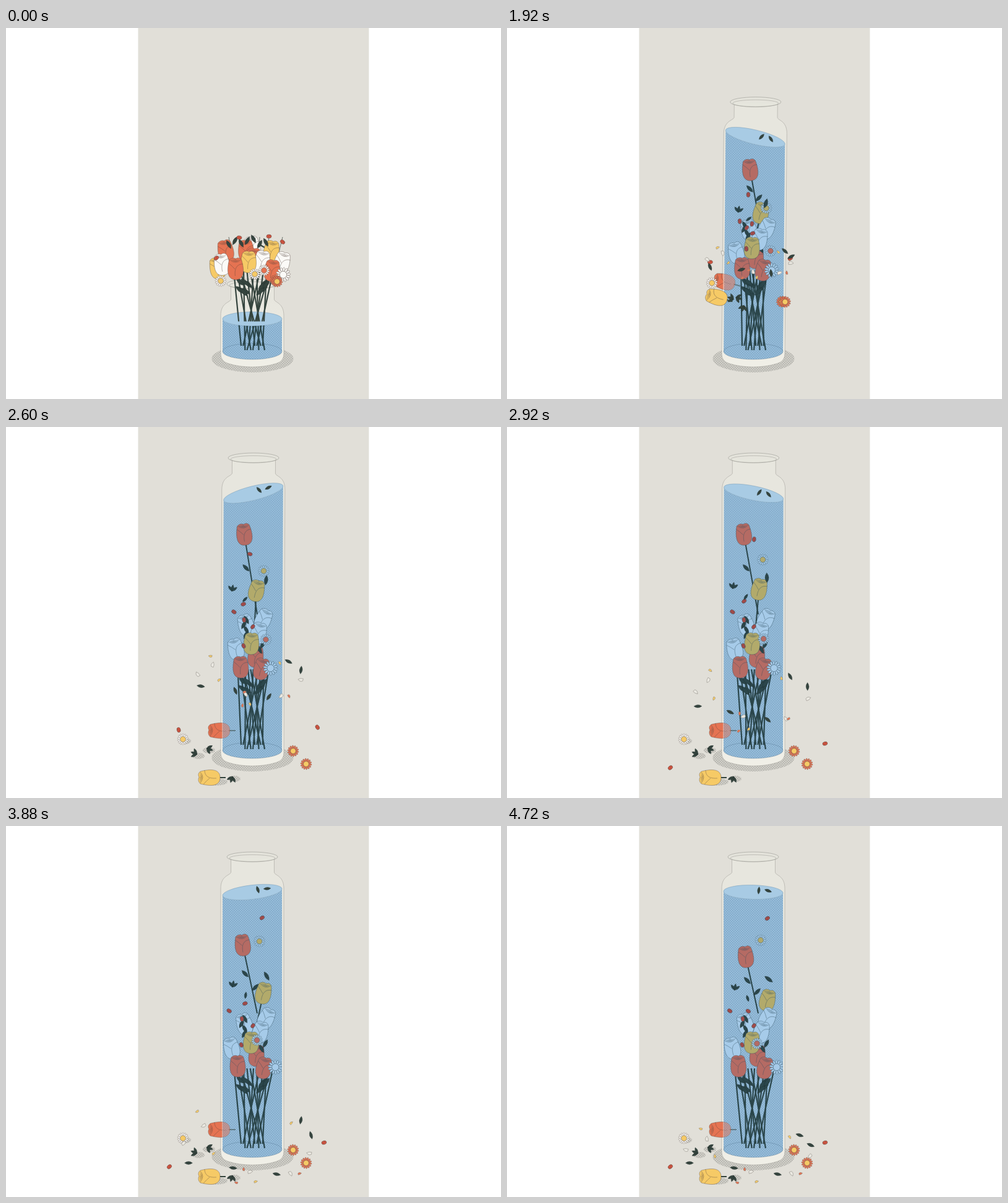
An HTML page with a canvas for the animation above (4760 ms loop, 800 by 600 pixels).

```html
<!DOCTYPE html>
<html>
<head>
<meta charset="utf-8">
<style>
html, body { margin: 0; height: 100%; overflow: hidden; background: #fff; }
canvas { display: block; }
</style>
</head>
<body>
<canvas id="stage" width="800" height="600"></canvas>
<script>
const c = document.getElementById('stage').getContext('2d');
const LOOP = 4760, BURST = 1760, SETTLE = 2280, MID = 398;
const DRY = { red: '#e57352', yellow: '#f6ca66', white: '#fbfaf7', green: '#35443e', berry: '#d65440', line: 'rgba(80,65,58,.75)' };
const WET = { red: '#b56b64', yellow: '#b2aa6b', white: '#a6cbe9', green: '#2b464b', berry: '#ad4b47', line: 'rgba(45,75,92,.75)' };
let pal = DRY, t = 0, since = 0, grow = 0;

// Blooms go from the bouquet to their place under water; those with "via" float on their own.
const BACK_ROSES = [
  { color: 'white', from: [398, 354], to: [385, 320], angle: -.3 },
  { color: 'red', from: [388, 360], via: [394, 198], to: [386, 212], lift: 31, angle: -.12 },
  { color: 'yellow', from: [429, 361], via: [406, 284], to: [421, 282], lift: 21, angle: .22 },
  { color: 'white', from: [446, 379], to: [421, 311], angle: .45 },
  { color: 'red', from: [400, 373], to: [405, 371], angle: .1 }
];
const FRONT_ROSES = [
  { color: 'white', from: [414, 377], to: [411, 333], angle: .25 },
  { color: 'white', from: [349, 382], to: [364, 359], angle: -.25 },
  { color: 'yellow', from: [392, 378], to: [396, 350], angle: .05 },
  { color: 'red', from: [371, 389], to: [374, 388], angle: -.05 },
  { color: 'red', from: [430, 392], to: [417, 391], angle: .2 }
];
const DAISIES = [
  { color: 'white', middle: 'white', from: [448, 399], to: [436, 390], scale: 1.3 },
  { color: 'white', middle: 'yellow', from: [402, 398], via: [423, 266], to: [410, 185], lift: 15 },
  { color: 'white', middle: 'red', from: [417, 392], via: [428, 353], to: [404, 352], lift: 10 }
];
const BERRIES = [
  { from: [377, 339], via: [393, 253], to: [421, 150], lift: 25 },
  { from: [425, 337], via: [389, 312], to: [390, 300], lift: 25 },
  ...[[360, 299], [399, 323], [381, 312], [380, 354]].map(to => ({ from: [390, 370], to, hidden: true }))
];
const FLOATING_LEAVES = [[368, 265], [389, 279], [423, 248]].map(to => ({ from: [398, 375], via: [to[0], to[1] + 14], to, lift: 12 }));

// Things thrown out of the vase, landing on the table.
const LOST_ORANGE = { color: 'red', from: [355, 360], land: [344, 491], time: 420 };
const LOST_YELLOW = { color: 'yellow', from: [342, 388], land: [328, 567], time: 610 };
const LOST_DAISIES = [
  { color: 'white', middle: 'yellow', from: [347, 409], land: [286, 505], time: 620, arc: 28 },
  { color: 'red', middle: 'yellow', from: [436, 408], land: [464, 524], time: 540 },
  { color: 'red', middle: 'yellow', from: [438, 410], land: [485, 545], time: 660 }
];
const LOST_BERRIES = [
  { from: [340, 372], land: [264, 551], time: 1050, arc: 40 },
  { from: [447, 346], land: [514, 512], time: 1000 }
];
const LOST_SPRIGS = [[325, 520], [366, 566], [308, 529]].map(land => ({ from: [390, 400], land, time: 540 }));
// Where the slow petals and leaves come to rest.
const DEBRIS = {
  white: [[289, 524], [317, 506], [388, 559], [459, 562], [495, 534]],
  yellow: [[313, 490], [330, 534], [397, 575], [456, 503]],
  red: [[372, 577], [378, 555], [468, 562]],
  leaf: [[295, 545], [361, 553], [431, 563], [472, 500], [496, 516]]
};

const mix = (a, b, k) => a + (b - a) * k;
const mixPoint = (a, b, k) => [mix(a[0], b[0], k), mix(a[1], b[1], k)];
const unit = v => Math.min(1, Math.max(0, v));
function seeded(seed) {
  return () => (seed = seed * 16807 % 2147483647) / 2147483647;
}

// The bunch is pinched at first, then opens out again.
const spread = x => MID + (x - MID) * (1 - .42 * grow * Math.exp(-since / 500));

function place({ from, via, to, land, time, lift = 0, arc = 0 }) {
  if (t <= BURST) return from;
  if (land) {
    const k = unit((t - BURST) / time), [x, y] = mixPoint(from, land, k);
    return [x, y - 4 * arc * k * (1 - k)];
  }
  if (!via) return mixPoint(from, [spread(to[0]), to[1]], grow);
  if (t < SETTLE) return mixPoint(from, via, grow);
  const k = since / (LOOP - SETTLE), [x, y] = mixPoint(via, to, 1 - (1 - k) ** 2);
  return [x - lift * .25 * Math.sin(Math.PI * Math.sqrt(k)), y - lift * Math.sin(Math.PI * Math.sqrt(k))];
}

function halftone(color) {
  const tile = document.createElement('canvas');
  tile.width = tile.height = 4;
  const p = tile.getContext('2d');
  p.fillStyle = color;
  for (const o of [0, 2]) p.fillRect(o, o, 1.5, 1.5);
  return c.createPattern(tile, 'repeat');
}
const WATER_DOTS = halftone('rgba(80,125,160,.4)');
const SHADE_DOTS = halftone('rgba(85,85,82,.3)');
const GLASS = c.createLinearGradient(0, 440, 0, 535);
GLASS.addColorStop(0, '#e7e6de');
GLASS.addColorStop(1, '#f0efe7');

function at([x, y], angle, draw) {
  c.save();
  c.translate(x, y);
  c.rotate(angle);
  c.beginPath();
  draw();
  c.restore();
}
function paint(fill, line = pal.line, width = .5) {
  c.fillStyle = fill;
  c.fill();
  c.strokeStyle = line;
  c.lineWidth = width;
  c.stroke();
}
function oval(x, y, rx, ry, angle = 0) {
  c.beginPath();
  c.ellipse(x, y, rx, ry, angle, 0, 7);
}
function stem(x1, y1, x2, y2, width = 2) {
  c.beginPath();
  c.moveTo(x1, y1);
  c.lineTo(x2, y2);
  c.strokeStyle = pal.green;
  c.lineWidth = width;
  c.stroke();
}
function clipped(path, draw) {
  c.save();
  c.clip(path);
  draw();
  c.restore();
}
function shadow(x, y, rx, ry) {
  oval(x, y, rx, ry);
  for (const fill of ['rgba(140,138,133,.2)', SHADE_DOTS]) {
    c.fillStyle = fill;
    c.fill();
  }
}

function rose(bloom) {
  const angle = bloom.land ? mix(-.2, -Math.PI / 2, grow) : bloom.angle * mix(.6, 1, grow);
  at(place(bloom), angle, () => {
    if (bloom.land && t > BURST) stem(0, 16, 0, 27);
    c.beginPath();
    c.moveTo(-10, -14);
    c.bezierCurveTo(-14, 1, -15, 18, 0, 18);
    c.bezierCurveTo(15, 18, 14, 1, 10, -14);
    c.quadraticCurveTo(6, -19, 1, -16);
    c.quadraticCurveTo(-5, -19, -10, -14);
    paint(pal[bloom.color]);
    c.beginPath();
    c.moveTo(12, -7);
    c.bezierCurveTo(2, -7, -2, 0, -1, 12);
    c.moveTo(-11, -9);
    c.quadraticCurveTo(-6, -5, -1, 1);
    for (let r = 9; r > 1; r -= 2.5) {
      c.moveTo(-r, -15 + r * .1);
      c.quadraticCurveTo(1, -15 + r, r, -14);
    }
    c.stroke();
  });
}
function daisy(bloom) {
  const p = place(bloom);
  at(p, p[1] * .02, () => {
    c.scale(bloom.scale || 1, bloom.scale || 1);
    for (let i = 0; i < 14; i++) {
      c.rotate(Math.PI / 7);
      oval(6.4, 0, 2.8, 1.3);
      paint(pal[bloom.color], pal.line, .4);
    }
    oval(0, 0, 4.3, 4.3);
    paint(pal[bloom.middle], pal.line, .4);
  });
}
function leaf(p, angle, length) {
  at(p, angle, () => {
    c.moveTo(-length / 2, 0);
    c.quadraticCurveTo(0, -length * .38, length / 2, 0);
    c.quadraticCurveTo(0, length * .38, -length / 2, 0);
    paint(pal.green, 'rgba(20,32,32,.6)', .4);
  });
}
function berry(fruit) {
  const p = place(fruit);
  at(p, p[1] * .07, () => {
    oval(0, 0, 2.9, 4);
    paint(pal.berry, pal.line, .7);
    c.fillStyle = pal.line;
    c.fillRect(-1, -1.5, 1, 1);
    c.fillRect(.4, .6, 1, 1);
  });
}
function sprig(p, angle, length) {
  for (const turn of [-.8, 0, .8]) {
    const a = angle + turn;
    leaf([p[0] + Math.cos(a) * length * .4, p[1] + Math.sin(a) * length * .4], a, length);
  }
}

// Blown up and outward, then a steady fluttering fall.
function debris(kind, land, i) {
  const [lx, ly] = land, high = [mix(MID, lx, .84), 355 + (ly - 500) * .7];
  const k = unit(since / (2000 - (ly - 490) * 8));
  const [x, y] = t < SETTLE ? mixPoint([MID, 385], high, grow) : mixPoint(high, land, k);
  const p = [x + 7 * Math.sin(k * 2 * Math.PI + i), y], angle = i * 1.3 + y * .06 * (1 - k);
  if (kind === 'leaf') return leaf(p, angle * (1 - k) + .1 * i, 13);
  const size = kind === 'white' ? 4.2 : 3;
  at(p, angle, () => {
    c.moveTo(-size, -size * .4);
    c.quadraticCurveTo(0, -size * .8, size, -size * .3);
    c.lineTo(size * .7, size * .5);
    c.quadraticCurveTo(-size * .4, size * .9, -size, -size * .4);
    paint(kind === 'white' ? '#eae8e1' : pal[kind], '#85817a');
  });
}

function foliage() {
  const random = seeded(71);
  for (let i = 0; i < 11; i++) {
    const side = i % 2 ? 1 : -1;
    const low = [spread(MID + side * (6 + random() * 22)), 408 + random() * 20];
    leaf(low, -Math.PI / 2 + side * (.4 + random() * .6), 17);
    if (i > 6) continue;
    const top = [360 + i * 10, 340 + random() * 18];
    const raised = [spread(376 + random() * 12 + (i > 3) * 34), 312 + i * 8];
    leaf(mixPoint(top, raised, grow), -Math.PI / 2 + side * .5, 15);
  }
}

function bouquet() {
  if (t < BURST) {
    for (const x of [360, 377, 410, 425, 447]) stem(x, 338, mix(x, MID, .3), 400, .7);
    [LOST_ORANGE, LOST_YELLOW].forEach(rose);
  }
  const count = 13;
  for (let i = 0; i < count; i++) {
    const k = i / (count - 1), foot = i * 5 % count;
    stem(spread(mix(368, 432, k)), 392, mix(380, 418, foot / (count - 1)), 514 + i * 7 % 14, 2.2);
  }
  const [rx, ry] = place(BACK_ROSES[1]), [yx, yy] = place(BACK_ROSES[2]);
  const joint = [406, Math.max(ry, 303)];
  stem(rx, ry, ...joint);
  stem(yx, yy, 400, 345);
  if (grow > .4) {
    for (const [k, side] of [[.42, -1], [.62, 1]]) {
      const [x, y] = mixPoint([rx, ry], joint, k);
      leaf([x + side * 6, y], -side * .8, 15);
    }
  }
  BACK_ROSES.forEach(rose);
  foliage();
  FRONT_ROSES.forEach(rose);
  DAISIES.forEach(daisy);
  BERRIES.filter(b => t > BURST || !b.hidden).forEach(berry);
  if (t > BURST) {
    FLOATING_LEAVES.forEach((l, i) => i ? leaf(place(l), i * 2.5 - since * .0005, 6 + i * 5) : sprig(place(l), -1.4, 11));
  }
}

function vase(drop) {
  c.beginPath();
  c.moveTo(363.5, 52 + drop);
  c.lineTo(363.5, 75 + drop);
  c.bezierCurveTo(362, 80 + drop, 347, 80 + drop, 347, 101 + drop);
  c.lineTo(347, 527);
  c.quadraticCurveTo(347, 539, 359, 542.5);
  c.bezierCurveTo(382, 550, 414, 550, 437, 542.5);
  c.quadraticCurveTo(449, 539, 449, 527);
  c.lineTo(449, 101 + drop);
  c.bezierCurveTo(449, 80 + drop, 434, 80 + drop, 433.5, 75 + drop);
  c.lineTo(433.5, 52 + drop);
  paint(GLASS, '#9a9993');
  oval(MID, 50 + drop, 41, 8);
  paint('rgba(231,230,222,.6)', '#8b8a85');
  oval(MID, 52 + drop, 37, 5.5);
  paint('rgba(231,230,222,.6)', '#9a9993');
}

function fallen() {
  const outside = new Path2D(), behindGlass = new Path2D();
  outside.rect(0, 0, 349, 600);
  behindGlass.rect(349, 0, 451, 600);
  clipped(outside, () => rose(LOST_ORANGE));
  clipped(behindGlass, () => {
    c.globalAlpha = .5;
    rose(LOST_ORANGE);
  });
  if (t > SETTLE - 60) {
    for (const { land: [x, y] } of [...LOST_SPRIGS, LOST_DAISIES[0]]) shadow(x + 3, y + 3, 10, 5);
    shadow(338, 574, 20, 6);
  }
  LOST_SPRIGS.forEach((s, i) => sprig(place(s), i * 1.6 + .3, 11));
  rose(LOST_YELLOW);
}

function frame() {
  t = performance.now() % LOOP;
  since = Math.max(0, t - SETTLE);
  grow = 1 - (1 - unit((t - BURST) / 380)) ** 3;
  const lean = 5.5 * Math.exp(-since / 320) * grow;
  const tilt = .3 * Math.exp(-since / 1700) * Math.cos(2 * Math.PI * since / 640) * grow;
  const level = mix(470.5, 107, grow);

  pal = DRY;
  c.fillStyle = '#fff';
  c.fillRect(0, 0, 800, 600);
  c.fillStyle = '#e1dfd8';
  c.fillRect(213.5, 0, 373, 600);
  shadow(398.5, 535, 66, 22);

  const water = new Path2D(), rx = 48 * Math.hypot(1, tilt), angle = Math.atan(tilt);
  water.ellipse(MID, level, rx, 11.5, angle, 0, Math.PI);
  water.ellipse(MID, 523, 48, 13, 0, Math.PI, 0, true);
  water.closePath();

  c.save();
  c.transform(1, 0, -lean / 480, 1, lean * 530 / 480, 0);
  vase(mix(364, 0, grow));
  for (const fill of ['#96bcd9', WATER_DOTS]) {
    c.fillStyle = fill;
    c.fill(water);
  }
  oval(MID, 523, 48, 13);
  c.strokeStyle = 'rgba(60,95,122,.6)';
  c.lineWidth = .5;
  c.stroke();
  oval(MID, level, rx, 11.5, angle);
  paint('#a8cbe4', '#7299b5');
  c.restore();

  pal = WET;
  clipped(water, bouquet);
  pal = DRY;
  const above = new Path2D();
  above.rect(0, 0, 800, level + 4);
  clipped(above, bouquet);

  if (t > BURST) {
    [407, 422].forEach((x, i) => leaf([x + lean, level - 3 + tilt * (x - MID)], 1.6 + i * 1.8 + tilt * 3, 12));
    fallen();
  }
  LOST_DAISIES.forEach(daisy);
  LOST_BERRIES.forEach(berry);
  if (t > BURST) {
    for (const kind in DEBRIS) DEBRIS[kind].forEach((land, i) => debris(kind, land, i));
  }
  requestAnimationFrame(frame);
}
frame();
</script>
</body>
</html>
```
